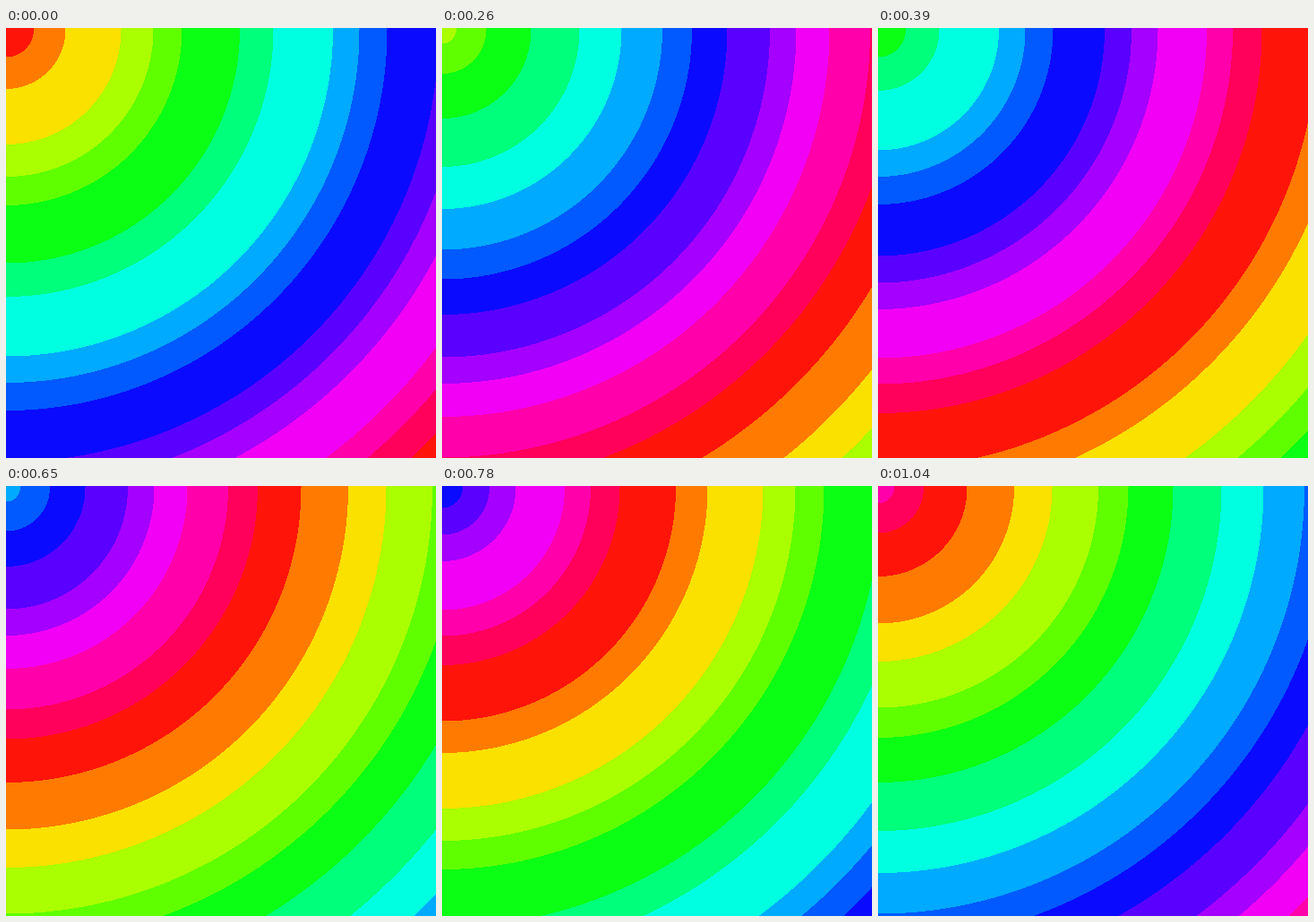
These frames come from a looping animation (480x480 px, 1.17 s). An HTML page:

```html
<!DOCTYPE html>
<html lang="en">
<head>
<meta charset="utf-8">
<title>Rainbow rings</title>
<style>
  html, body { margin: 0; width: 100%; height: 100%; overflow: hidden; }
  #strip {
    display: flex;
    width: 4320px;
    height: 480px;
    animation: advance 1170ms steps(9) infinite;
  }
  #strip div { flex: 0 0 480px; height: 480px; }
  @keyframes advance { to { transform: translateX(-4320px); } }
</style>
</head>
<body>
<div id="strip"></div>
<script>
  const STEPS = 9, REACH = 700;

  // Each flat colour and the hue, in degrees, up to which it is used.
  const bands = [
    ['#ff140a', 16.5], ['#ff7a00', 40], ['#fae100', 67.5], ['#aaff00', 88.5],
    ['#5fff00', 108.5], ['#0aff14', 136.5], ['#00ff7a', 161], ['#00ffe1', 190.5],
    ['#00aaff', 208.5], ['#005aff', 228], ['#0a0aff', 252], ['#5a00ff', 271],
    ['#a500ff', 289], ['#f200f5', 311.5], ['#ff00aa', 329.5], ['#ff005a', 349.5]
  ];

  function colorOf(hue) {
    const band = bands.find(([, end]) => hue % 360 < end) || bands[0];
    return band[0];
  }

  // Hue grows with the radius and lingers at each primary and secondary colour.
  function hueAt(radius) {
    const sector = (radius + 6) / 115;
    return 60 * sector - 3 * Math.sin(2 * Math.PI * sector);
  }

  function rings(turn) {
    const stops = [];
    let start = 0, color = colorOf(hueAt(0) + turn);
    for (let r = 0.5; r <= REACH; r += 0.5) {
      const next = colorOf(hueAt(r) + turn);
      if (next !== color || r === REACH) {
        stops.push(`${color} ${start}px ${r}px`);
        start = r;
        color = next;
      }
    }
    return `radial-gradient(circle at 0 1.5px, ${stops.join(', ')})`;
  }

  const strip = document.getElementById('strip');
  for (let i = 0; i < STEPS; i++) {
    const panel = document.createElement('div');
    panel.style.background = rings(i * 360 / STEPS);
    strip.append(panel);
  }
</script>
</body>
</html>
```
